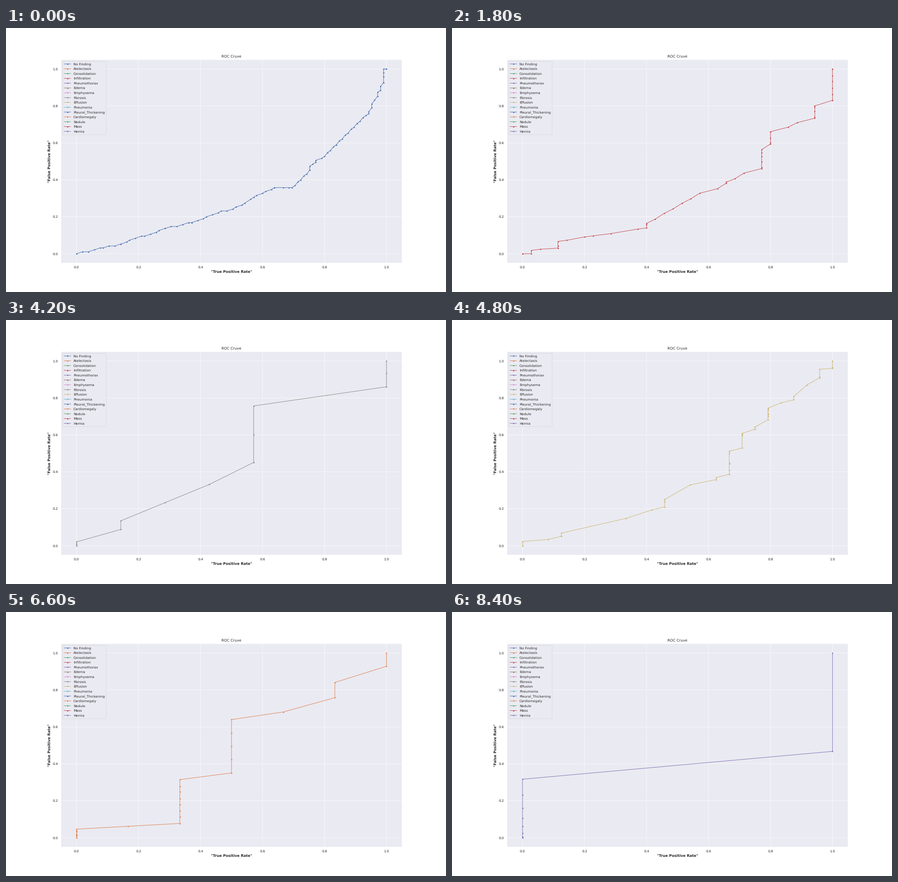
Animation, 966 px wide and 580 px high, one loop 9000 ms. Source, as a matplotlib script:

```python
import numpy as np
import matplotlib.pyplot as plt
from matplotlib.animation import FuncAnimation
from matplotlib.lines import Line2D

W, H, DPI = 966, 580, 100
K = 0.483      # scales a 20 x 12 inch layout down to the stage
SAMPLES = 200  # positives + negatives behind each curve

NAMES = ["No Finding", "Atelectasis", "Consolidation", "Infiltration",
         "Pneumothorax", "Edema", "Emphysema", "Fibrosis", "Effusion",
         "Pneumonia", "Pleural_Thickening", "Cardiomegaly", "Nodule",
         "Mass", "Hernia"]
PALETTE = ["#4C72B0", "#DD8452", "#55A868", "#C44E52", "#8172B3",
           "#937860", "#DA8BC3", "#8C8C8C", "#CCB974", "#64B5CD"]
INK = "0.15"

scaled = {
    "font.size": 12, "axes.titlesize": 12, "axes.labelsize": 12,
    "xtick.labelsize": 11, "ytick.labelsize": 11, "legend.fontsize": 11,
    "axes.linewidth": 1.25, "grid.linewidth": 1, "patch.linewidth": 1,
    "lines.linewidth": 1.5, "lines.markersize": 6, "lines.markeredgewidth": 1,
    "xtick.major.size": 6, "ytick.major.size": 6,
    "xtick.major.pad": 3.5, "ytick.major.pad": 3.5,
    "axes.titlepad": 6, "axes.labelpad": 4,
}
plt.rcParams.update({key: value * K for key, value in scaled.items()})
plt.rcParams.update({
    "font.family": "DejaVu Sans", "text.hinting": "none", "path.snap": False,
    "text.color": INK, "axes.labelcolor": INK,
    "xtick.color": INK, "ytick.color": INK,
    "axes.facecolor": "#EAEAF2", "axes.edgecolor": "white",
    "axes.grid": True, "grid.color": "white", "grid.linestyle": "-",
    "axes.axisbelow": True, "xtick.bottom": False, "ytick.left": False,
    "lines.solid_capstyle": "round", "legend.labelspacing": 0.515,
})


def rates(points, positives):
    """Turn (positive, negative) counts into rates, with a doubled start."""
    points = np.vstack([[0, 0], points])
    return points / [positives, SAMPLES - positives]


def trace(positives, dots, *keys):
    """Walk through the key counts in even strides, landing on whole counts."""
    keys = np.array(keys)
    reach = keys.sum(axis=1)
    at = np.union1d(reach, np.linspace(0, SAMPLES, dots))
    walk = np.column_stack([np.interp(at, reach, axis) for axis in keys.T])
    return rates(np.vstack([np.rint(walk), keys[-1]]), positives)


def climb(positives, power, *runs):
    """Vertical runs (x, bottom, top, dots), the dots spreading out upwards."""
    points = [(x, round(low + (high - low) * t ** power))
              for x, low, high, dots in runs for t in np.linspace(0, 1, dots)]
    return rates(points, positives)


def simulate(positives, seed, cuts=45, shift=0.6):
    """ROC counts of random scores at a random set of thresholds."""
    rng = np.random.default_rng(seed)
    hit = np.arange(SAMPLES) < positives
    hit = hit[np.argsort(-(rng.normal(size=SAMPLES) + shift * hit))]
    counts = np.column_stack([np.cumsum(hit), np.cumsum(~hit)])
    at = np.sort(rng.integers(0, SAMPLES, cuts))
    return rates(np.vstack([[0, 0], counts[at], counts[-1], counts[-1]]),
                 positives)


curves = [
    trace(105, 80, (0, 0), (15, 5), (30, 13), (39, 16), (54, 24), (67, 34),
          (73, 34), (81, 47), (88, 56), (99, 72), (104, 88), (104, 95),
          (105, 95)),
    simulate(20, 1),
    simulate(9, 2),
    trace(35, 36, (0, 0), (1, 0), (1, 3), (4, 5), (4, 11), (8, 16), (14, 23),
          (14, 27), (18, 45), (23, 64), (27, 77), (27, 90), (28, 99),
          (28, 109), (33, 122), (33, 131), (35, 137), (35, 165)),
    simulate(6, 4, cuts=25),
    climb(3, 2, (0, 0, 49, 17), (1, 57, 81, 4), (2, 91, 142, 4),
          (3, 154, 197, 3)),
    simulate(5, 6, cuts=22),
    climb(7, 1, (0, 0, 4, 3), (1, 17, 26, 2), (2, 45, 45, 1), (3, 64, 64, 1),
          (4, 87, 146, 3), (7, 166, 193, 3)),
    simulate(24, 8),
    climb(4, 2, (0, 0, 11, 6), (1, 14, 52, 6), (3, 71, 116, 2),
          (4, 196, 196, 1)),
    simulate(6, 10, cuts=25),
    climb(6, 1, (0, 0, 9, 7), (1, 12, 12, 1), (2, 15, 61, 8), (3, 68, 124, 5),
          (4, 132, 132, 1), (5, 147, 163, 2), (6, 180, 194, 2)),
    simulate(14, 12),
    simulate(11, 13),
    climb(1, 2, (0, 0, 63, 8), (1, 93, 199, 2)),
]
colors = [PALETTE[i % len(PALETTE)] for i in range(len(NAMES))]

fig, ax = plt.subplots(figsize=(W / DPI, H / DPI), dpi=DPI)
fig.subplots_adjust(left=0.125, right=0.9, bottom=0.11, top=0.88)
ax.set(xlim=(-0.05, 1.05), ylim=(-0.05, 1.05), title="ROC Cruve")
ax.set_xlabel('"True Positive Rate"', fontweight="bold")
ax.set_ylabel('"False Positive Rate"', fontweight="bold")
ax.legend(handles=[Line2D([], [], marker=".", color=c, label=name)
                   for name, c in zip(NAMES, colors)], loc="upper left")
line, = ax.plot([], [], marker=".")


def draw(i):
    line.set_data(*curves[i].T)
    line.set_color(colors[i])
    return line,


anim = FuncAnimation(fig, draw, frames=len(NAMES), interval=600,
                     init_func=lambda: draw(0), repeat=True, repeat_delay=0)
plt.show()
```
